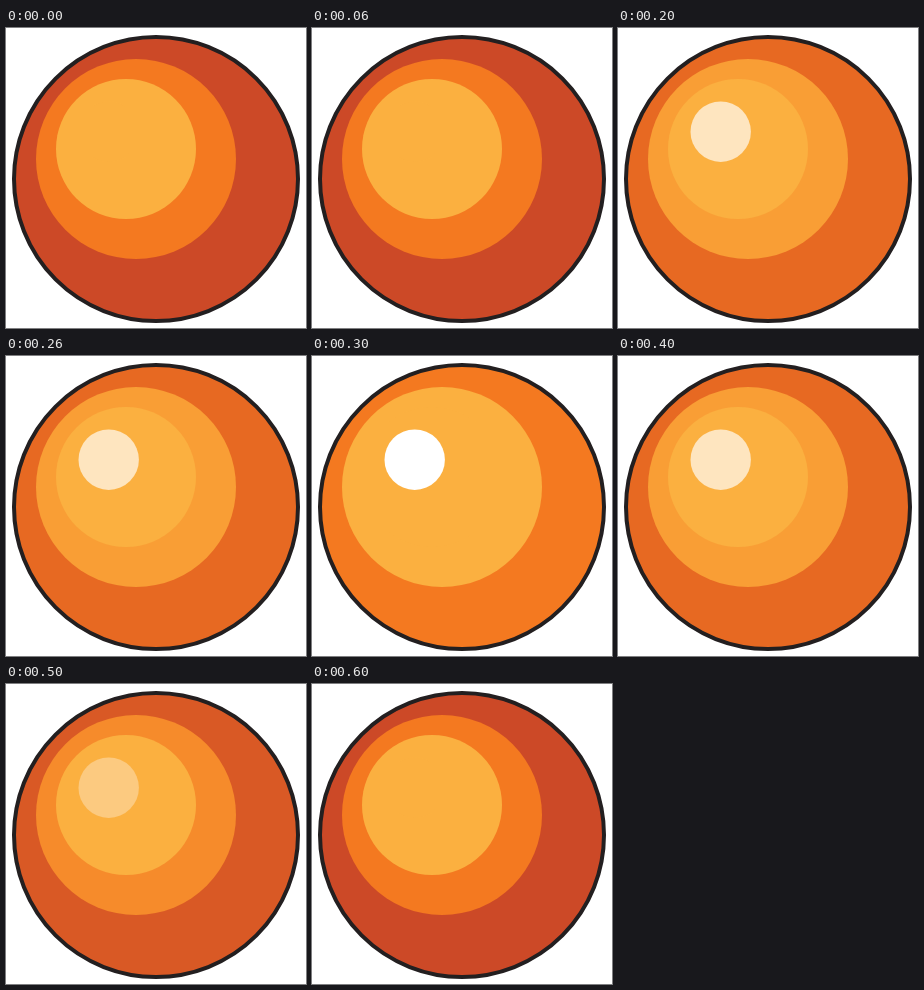
An HTML page that plays this animation: 300x300 px, repeating every 0.7 s.

```html
<!DOCTYPE html>
<html lang="en">
<head>
<meta charset="utf-8">
<title>Glowing ball</title>
<style>
  html, body { margin: 0; width: 100%; height: 100%; overflow: hidden; background: #fff; }
  svg { display: block; width: 100%; height: 100%; }
</style>
</head>
<body>
<svg viewBox="0 0 300 300">
  <circle id="ball" cx="150" cy="151" r="142" stroke="#231f20" stroke-width="4"/>
  <circle id="glow" cx="130" cy="131" r="100"/>
  <circle cx="120" cy="121" r="70" fill="#fbb040"/>
  <circle id="shine" cx="102.7" cy="103.7" r="30.2"/>
</svg>
<script>
  const RED = [204, 73, 39], ORANGE = [244, 121, 32], AMBER = [251, 176, 64], WHITE = [255, 255, 255];
  const STEP = 100, STEPS = 7, PEAK = 3;

  const mix = (a, b, t) => `rgb(${a.map((v, i) => Math.round(v + (b[i] - v) * t))})`;
  const paint = (id, from, to, heat) =>
    document.getElementById(id).setAttribute("fill", mix(from, to, heat));

  function draw() {
    const step = Math.floor(performance.now() / STEP) % STEPS;
    const heat = 1 - Math.abs(step - PEAK) / PEAK;
    paint("ball", RED, ORANGE, heat);
    paint("glow", ORANGE, AMBER, heat);
    paint("shine", AMBER, WHITE, heat);
    requestAnimationFrame(draw);
  }
  draw();
</script>
</body>
</html>
```
